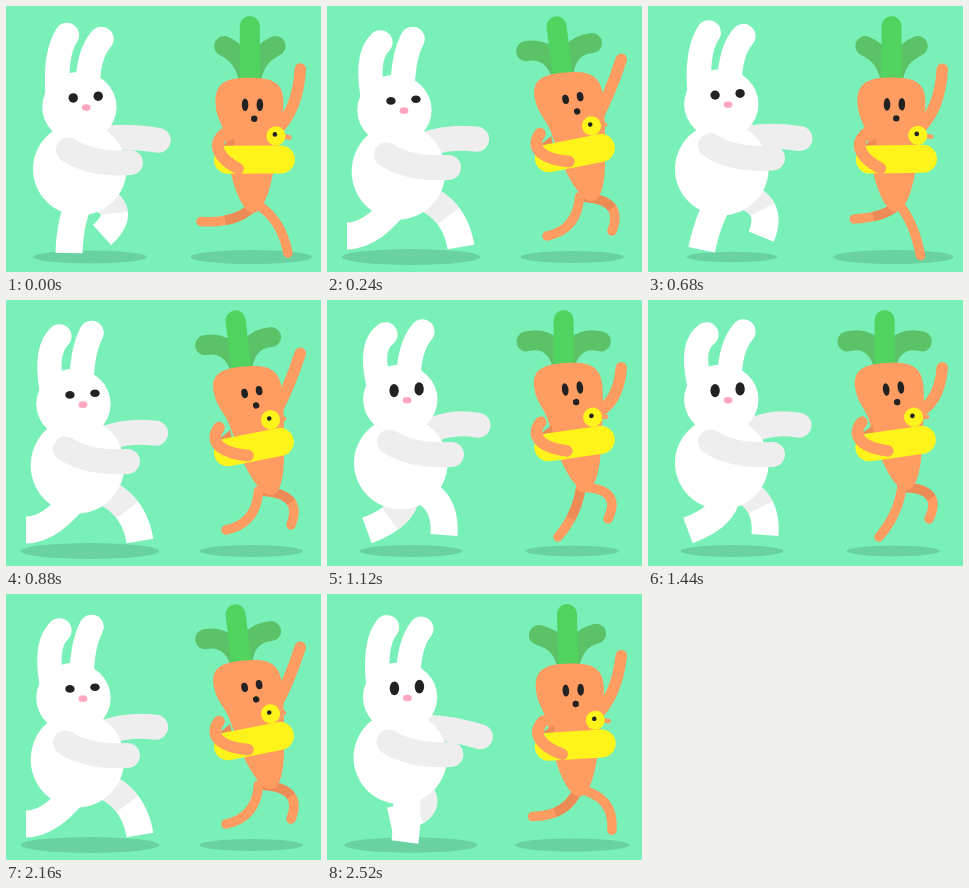
These frames come from a looping animation (315x266 px, 2560 ms). An HTML page:

```html
<!DOCTYPE html>
<html lang="en">
<head>
<meta charset="utf-8">
<title>Chase</title>
<style>
html, body { margin: 0; width: 100%; height: 100%; overflow: hidden; background: #78f0b7; }
svg { display: block; width: 100vw; height: 100vh; }
</style>
</head>
<body>
<svg id="stage" viewBox="0 0 315 266"></svg>
<script>
const WHITE = '#fff', GRAY = '#eee', INK = '#222', CARROT = '#ff9c61', SHADE = '#ed8b57';
const LEAF = '#5cc268', STEM = '#50d45f', YELLOW = '#fff31c', PINK = '#ffa6c1', SHADOW = '#6ad2a1';

const STEP = 320, STRIDE = STEP * 2, FRAME = 40;
let layer = document.getElementById('stage');
const parts = [];

// Shared drivers of one step; every part moves as a mix of these.
const wave = (t, peak) => .5 + .5 * Math.cos(2 * Math.PI * (t - peak) / STEP);
function pulse(t, peak, width) {
  const gap = Math.abs(t % STEP - peak);
  return Math.exp(-((Math.min(gap, STEP - gap) / width) ** 2));
}
const drivers = t => ({
  t,
  air: wave(t, 175),
  swell: wave(t, 249),
  land: pulse(t, 242, 30),
  rebound: pulse(t, 280, 28)
});

// Smooth periodic path through a few points at uneven times.
function track(times, poses) {
  const n = times.length;
  const time = i => times[(i + n) % n] + STRIDE * Math.floor(i / n);
  const pose = i => poses[(i + n) % n];
  const rate = (i, k) => (pose(i + 1)[k] - pose(i)[k]) / (time(i + 1) - time(i));
  const slope = (i, k) => {
    const before = time(i) - time(i - 1), after = time(i + 1) - time(i);
    return (rate(i - 1, k) * after + rate(i, k) * before) / (before + after);
  };
  return t => {
    t %= STRIDE;
    let i = n - 1;
    while (times[i] > t) i--;
    const h = time(i + 1) - time(i), u = (t - time(i)) / h, v = 1 - u;
    return pose(i).map((a, k) => a * v * v * (1 + 2 * u) + pose(i + 1)[k] * u * u * (3 - 2 * u)
      + h * u * v * (v * slope(i, k) - u * slope((i + 1) % n, k)));
  };
}

function set(el, attrs) {
  for (const k in attrs) el.setAttribute(k, attrs[k]);
}
function add(tag, attrs, move) {
  const el = document.createElementNS('http://www.w3.org/2000/svg', tag);
  set(el, attrs);
  layer.appendChild(el);
  if (move) parts.push(s => set(el, move(s)));
  return el;
}
function group(move, build) {
  const parent = layer;
  layer = add('g', {}, s => ({ transform: move(s) }));
  build();
  layer = parent;
}
const place = (x, y, turn = 0) => `translate(${x} ${y}) rotate(${turn})`;

function oval(fill, move) {
  add('ellipse', { fill }, s => {
    const [cx, cy, rx, ry = rx] = move(s);
    return { cx, cy, rx, ry };
  });
}

// Thick stroke along 2 points (line), 3 (quadratic) or 4 (cubic).
function limb(stroke, width, move, more) {
  add('path', { fill: 'none', stroke, 'stroke-width': width, 'stroke-linecap': 'round', ...more }, s => {
    const p = move(s);
    return { d: `M${p[0]} ${p[1]}${{ 4: 'L', 6: 'Q', 8: 'C' }[p.length]}${p.slice(2).join(' ')}` };
  });
}
const shaded = { 'stroke-linecap': 'butt', pathLength: 100, 'stroke-dasharray': '60 200' };

function shadow(x, radius) {
  oval(SHADOW, s => [x, 251, radius(s), radius(s) * .115]);
}

function rabbit() {
  // Knee and foot.
  const path = track([0, 160, 240, 280, 320, 480, 560, 600], [
    [64, 210, 63, 247], [84, 214, 40, 230.5], [48, 230, 20, 230], [122, 214, 63, 227],
    [128, 200, 96, 229], [120, 192, 117, 235], [126, 194, 134, 241], [82, 218, 78, 248]]);
  const leg = s => [78, 186, ...path(s.t)];
  const farLeg = s => [78, 186, ...path(s.t + STEP)];
  const blunt = { 'stroke-linecap': 'butt' };
  const head = (s, ahead = 0) =>
    place(73.3 + s.rebound + (ahead - 6) * s.land, 96.5 + 7.5 * s.swell);

  shadow(84, s => 38.5 + 31 * s.swell);
  limb(GRAY, 25, ({ air, land, rebound }) => [
    100, 132 + 6 * land,
    124, 129 - 9 * air + 6 * land + 6 * rebound,
    152 - air - 2 * land + 2 * rebound, 133 - 8 * air + 4 * land + 11 * rebound]);
  limb(WHITE, 27, farLeg, blunt);
  limb(GRAY, 27, farLeg, shaded);
  oval(WHITE, ({ land }) => [73.8 - 2.3 * land, 163 + 2.5 * land, 46.8, 46.2 + 1.7 * land]);
  group(s => head(s), () => {
    limb(WHITE, 24.5, ({ air }) => [-22, -16, -24 - 7 * air, -54, -12.5 - 2.5 * air, -72 + 7 * air]);
    limb(WHITE, 24.5, ({ land }) => [8, -16, 8, -52, 22 - 4 * land, -68 - 3 * land]);
    oval(WHITE, () => [0, 0, 37.2, 35.2]);
  });
  limb(WHITE, 27, leg, blunt);
  group(s => place(62.5 - 3 * s.land, 137 + 12 * s.swell), () =>
    limb(GRAY, 25, () => [0, 0, 24, 15, 62, 12.5]));
  group(s => head(s, 2.7), () => {
    for (const [x, y] of [[-6.2, -9], [18.8, -10.7]]) {
      oval(INK, ({ air, land, rebound }) =>
        [x, y, 4.7, 4.4 + 2.2 * air - 2.3 * land + 2.4 * rebound]);
    }
    oval(PINK, () => [6.8, .7, 4.4, 3.3]);
  });
}

function carrot() {
  // Knee and foot.
  const path = track([0, 160, 240, 320, 480, 560], [
    [275, 212, 282, 247], [250, 215, 231, 237], [250, 224, 220, 230],
    [232, 218, 195, 215.5], [296, 188, 281, 219], [298, 192, 285, 225]]);
  const leg = (s, lag = 0) => [250 + 4 * s.air, 198 - 11 * s.air, ...path(s.t + lag)];
  const farLeg = s => leg(s, STEP);
  const tilt = s => -8 * s.air - 5.8 * s.land;

  shadow(245.3, s => 61 - 14.5 * s.air);
  limb(CARROT, 9.5, farLeg);
  limb(SHADE, 9.5, farLeg, shaded);
  limb(CARROT, 11.5, ({ air, land }) => [
    270 - 5 * air, 125 - 11 * air,
    292 - air - 9 * land, 104 + 2 * air - 15 * land,
    294.3, 63 + 5 * air - 13 * land]);

  group(s => place(244 - 7.5 * s.air - 4 * s.land, 72 - 9 * s.air, -7 * s.land), () => {
    for (const side of [-1, 1]) {
      limb(LEAF, 20, ({ air }) => [
        0, 8, 3 * side, -15, (12 + 6 * air) * side, -25 - 2 * air, (25.5 + 12 * air) * side, -32 + 10.5 * air]);
    }
    limb(STEM, 20, s => [0, 8, 0, -52 + 9 * s.air]);
  });

  // Half turn, half shear keeps the top flat while the tip swings.
  add('path', {
    fill: CARROT,
    d: 'M-36.5-3C-36.5-23-24-27-2.5-27S31.5-23 31.5-3C31.5 9 29 17 28 29L21.5 65C18 85 11 108 1 108S-18 85-22 65L-27 33C-29 19-36.5 13-36.5-3Z'
  }, s => ({
    transform: place(246 - 2 * s.air, 99 - 10.8 * s.air, tilt(s) / 2)
      + `skewX(${-tilt(s) / 2}) scale(1 ${1 - .05 * s.air})`
  }));
  group(s => place(246.5 - s.air, 99 - 10.8 * s.air, tilt(s)), () => {
    for (const side of [-1, 1]) oval(INK, s => [7.4 * side, 0, 3.3, 6.3 - 1.6 * s.land]);
    oval(INK, () => [1.7, 14, 3.2]);
  });
  limb(CARROT, 9.5, s => leg(s));

  // Swim ring with its duck head and the arm holding it.
  group(s => place(248.5 - s.air, 153.7 - 10.5 * s.air, tilt(s)), () => {
    add('polygon', { fill: SHADE, points: '-33,-14 -20,-21 -20,-13' });
    limb(CARROT, 4.6, () => [28, -23, 35, -22]);
    oval(YELLOW, () => [21.5, -23.5, 9.6]);
    limb(YELLOW, 28, () => [-26.5, .3, 26.5, 0]);
    oval(INK, () => [20.5, -25, 2.3]);
    limb(CARROT, 11.5, s => [
      -30.5, -25.7, -43.5, -13.7, -34.5, -.7, -16.5 + 8 * s.air + 4 * s.land, 9.3 - 3 * s.air]);
  });
}

rabbit();
carrot();

let start;
function draw(now) {
  start ??= now;
  const state = drivers(Math.floor((now - start) / FRAME) * FRAME);
  parts.forEach(fn => fn(state));
  requestAnimationFrame(draw);
}
draw(performance.now());
</script>
</body>
</html>
```
